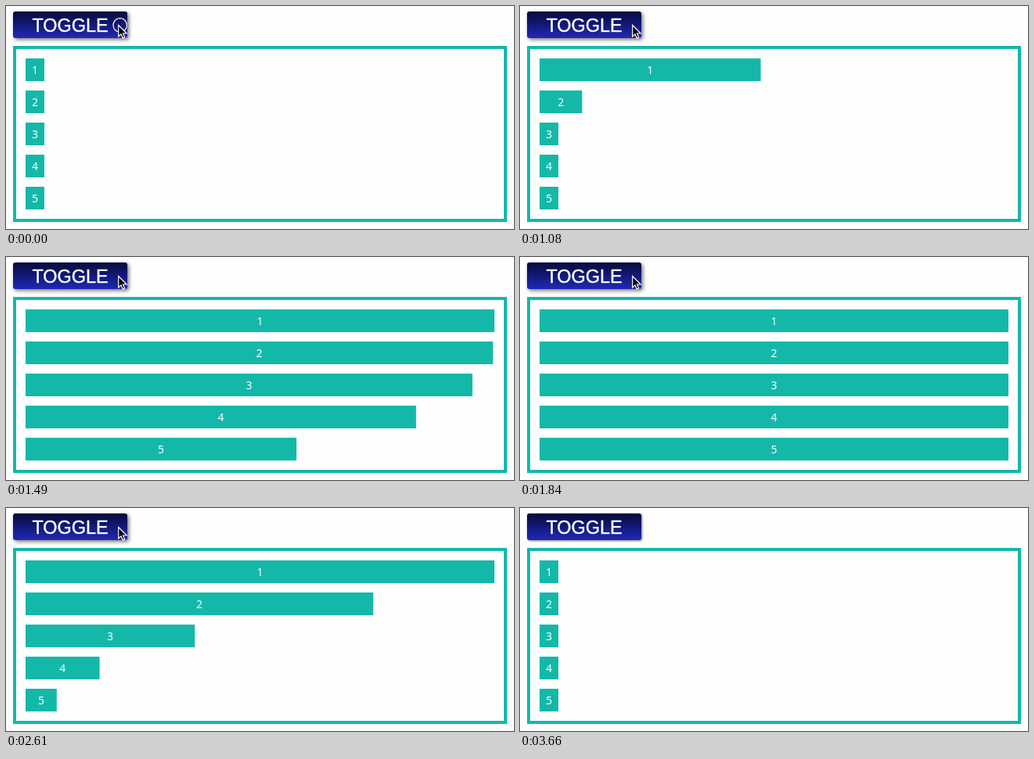
Animation of 649x285 px, one loop 4200 ms. Source, as an HTML page with a canvas:

```html
<!DOCTYPE html>
<html lang="en">
<head>
<meta charset="utf-8">
<title>Staggered toggle</title>
<style>
  html, body { margin: 0; width: 100%; height: 100%; overflow: hidden; background: #fefefe; }
  canvas { display: block; width: 649px; height: 285px; }
</style>
</head>
<body>
<canvas id="stage" width="649" height="285"></canvas>
<script>
const ctx = document.getElementById('stage').getContext('2d');
const LOOP = 4200;
const TICK = 58.3;
const OPEN_AT = 840, CLOSE_AT = 2140, LEAVE_AT = 3250;
const DURATION = 8.18;      // one bar's transition, in ticks
const STAGGER = DURATION / 5;
const OPEN_DELAY = 1.8, CLOSE_DELAY = 1.55;
const BARS = 5, MIN_W = 24, MAX_W = 599;
const TEAL = '#14b8a9';

const clamp = v => Math.min(1, Math.max(0, v));
const mix = (a, b, p) => a + (b - a) * p;
const ticksSince = (start, t) => Math.floor((t - start) / TICK + 0.05);

// cubic-bezier(.25, .1, .25, 1)
function ease(x) {
  if (x <= 0) return 0;
  if (x >= 1) return 1;
  const curve = (s, a, b) => 3 * (1 - s) ** 2 * s * a + 3 * (1 - s) * s * s * b + s ** 3;
  let lo = 0, hi = 1;
  for (let i = 0; i < 24; i++) {
    const mid = (lo + hi) / 2;
    if (curve(mid, 0.25, 0.25) < x) lo = mid; else hi = mid;
  }
  return curve(lo, 0.1, 1);
}

function barWidth(i, t) {
  if (t < CLOSE_AT) {
    const k = ticksSince(OPEN_AT, t) - OPEN_DELAY - i * STAGGER;
    return mix(MIN_W, MAX_W, ease(k / DURATION));
  }
  const k = ticksSince(CLOSE_AT, t) - CLOSE_DELAY - (BARS - 1 - i) * STAGGER;
  return mix(MAX_W, MIN_W, ease(k / DURATION));
}

function drawButton(hover) {
  const fill = ctx.createLinearGradient(0, 7, 0, 41);
  fill.addColorStop(0, '#060a3c');
  fill.addColorStop(1, '#2029b6');
  ctx.save();
  ctx.shadowColor = 'rgba(0,0,0,0.55)';
  ctx.shadowOffsetX = ctx.shadowOffsetY = mix(1, 2, hover);
  ctx.shadowBlur = mix(3, 5, hover);
  ctx.fillStyle = fill;
  ctx.beginPath();
  ctx.roundRect(9, 7, 146, 34, 3);
  ctx.fill();
  ctx.restore();

  ctx.font = '23.4px "Liberation Sans", Arial, sans-serif';
  ctx.textAlign = 'left';
  ctx.fillStyle = ctx.strokeStyle = '#fff';
  ctx.lineWidth = 0.4;
  ctx.fillText('TOGGLE', 33.5, 33);
  ctx.strokeText('TOGGLE', 33.5, 33);
}

function drawBars(t) {
  ctx.strokeStyle = TEAL;
  ctx.lineWidth = 4;
  ctx.strokeRect(11, 53, 627, 221);
  ctx.font = '500 14px "Noto Sans", "Open Sans", sans-serif';
  ctx.textAlign = 'center';
  for (let i = 0; i < BARS; i++) {
    const y = 67 + i * 41, w = barWidth(i, t);
    ctx.fillStyle = TEAL;
    ctx.fillRect(25, y, w, 29);
    ctx.fillStyle = '#fff';
    ctx.fillText(i + 1, 25 + w / 2, y + 20);
  }
}

function drawRing() {
  const circle = (r, width, color) => {
    ctx.lineWidth = width;
    ctx.strokeStyle = color;
    ctx.beginPath();
    ctx.arc(145.7, 24.5, r, 0, Math.PI * 2);
    ctx.stroke();
  };
  circle(9.6, 1, 'rgba(20,20,50,0.7)');
  circle(8.8, 1.2, '#fff');
}

function drawCursor(x, y) {
  const outline = [[0, 0], [0, 14.5], [3.3, 11.4], [5.6, 16.6], [8, 15.6], [5.8, 10.5], [10.4, 10.5]];
  ctx.save();
  ctx.translate(x, y);
  ctx.beginPath();
  outline.forEach(p => ctx.lineTo(...p));
  ctx.closePath();
  ctx.shadowColor = 'rgba(0,0,0,0.4)';
  ctx.shadowOffsetY = 1;
  ctx.shadowBlur = 2;
  ctx.fillStyle = '#000';
  ctx.fill();
  ctx.shadowColor = 'transparent';
  ctx.strokeStyle = '#fff';
  ctx.lineWidth = 1.2;
  ctx.stroke();
  ctx.restore();
}

function draw(t) {
  ctx.fillStyle = '#fefefe';
  ctx.fillRect(0, 0, 649, 285);
  const leaving = ticksSince(LEAVE_AT, t);
  drawButton(1 - clamp(leaving / 4));
  drawBars(t);

  const pressed = [OPEN_AT, CLOSE_AT].some(at => t >= at && ticksSince(at, t) < 2);
  if (t < 60 || pressed) drawRing();
  if (leaving < 7) {
    const p = clamp((leaving + 1) / 7) ** 1.5;
    drawCursor(mix(143.7, 521, p), mix(24.5, 274, p));
  }
}

const begin = performance.now();
function loop() {
  draw((performance.now() - begin) % LOOP);
  requestAnimationFrame(loop);
}
loop();
</script>
</body>
</html>
```
